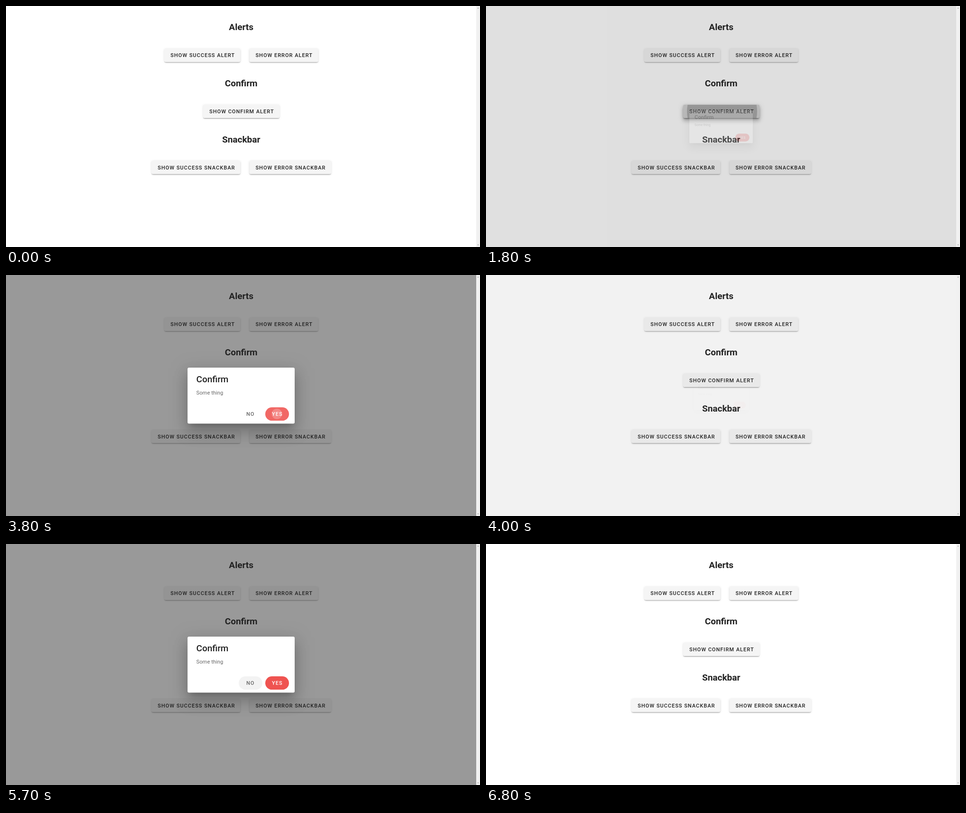
Animation of 1000 by 510 pixels, one loop 7.7 s. Source, as an HTML page:

```html
<!DOCTYPE html>
<html lang="en">
<head>
<meta charset="utf-8">
<title>Dialogs demo</title>
<style>
  html, body { margin: 0; width: 100%; height: 100%; overflow: hidden; background: #fff; }
  svg { display: block; width: 1000px; height: 510px; }
  text { font-family: Roboto, Arial, sans-serif; fill: #212121; white-space: pre; }
  .head { font-size: 19px; font-weight: 700; text-anchor: middle; }
  .label { font-size: 11.06px; font-weight: 500; letter-spacing: .0893em; }
  .title { font-size: 18.9px; font-weight: 500; }
  .body { font-size: 11.06px; letter-spacing: .0071em; }
</style>
</head>
<body>
<script>
const NS = 'http://www.w3.org/2000/svg';
const LOOP = 7700, STEP = 100;
const UNIT = 0.79; // page zoom

function set(node, attrs) {
  for (const k in attrs) node.setAttribute(k, attrs[k]);
  return node;
}
function add(parent, tag, attrs) {
  return parent.appendChild(set(document.createElementNS(NS, tag), attrs));
}
function rect(parent, x, y, width, height, rx, fill, more) {
  return add(parent, 'rect', { x, y, width, height, rx, fill, ...more });
}
function write(parent, cls, x, y, str, fill) {
  const node = add(parent, 'text', { class: cls, x, y });
  node.textContent = str;
  if (fill) node.style.fill = fill;
  return node;
}

const svg = add(document.body, 'svg', { viewBox: '0 0 1000 510' });
const defs = add(svg, 'defs', {});

// Each layer: [offset y, blur, spread, opacity]
const RAISED = [[3, 1, -2, .2], [2, 2, 0, .14], [1, 5, 0, .12]];
const PRESSED = [[5, 5, -3, .2], [8, 10, 1, .14], [3, 14, 2, .12]];
const MODAL = [[11, 15, -7, .2], [24, 38, 3, .14], [9, 46, 8, .12]];

function blurId(size) {
  const id = 'blur' + size;
  if (!document.getElementById(id)) {
    const f = add(defs, 'filter', { id, filterUnits: 'userSpaceOnUse', x: 0, y: 0, width: 1000, height: 510 });
    add(f, 'feGaussianBlur', { stdDeviation: size * UNIT / 2 });
  }
  return `url(#${id})`;
}
function shadow(parent, x, y, w, h, layers) {
  const g = add(parent, 'g', {});
  for (const [dy, blur, spread, opacity] of layers) {
    const s = spread * UNIT;
    rect(g, x - s, y - s + dy * UNIT, w + 2 * s, h + 2 * s, 3, '#000',
      { 'fill-opacity': opacity, filter: blurId(blur) });
  }
  return g;
}
function clip(id, x, y, w, h, rx) {
  rect(add(defs, 'clipPath', { id }), x, y, w, h, rx, '#000');
  return { 'clip-path': `url(#${id})` };
}
function ripple(parent, cx, cy, fill, area) {
  return add(add(parent, 'g', area), 'circle', { cx, cy, r: 0, fill, 'fill-opacity': 0 });
}

// Page
rect(svg, 0, 0, 1000, 510, 0, '#fff');
write(svg, 'head', 496.2, 51.4, 'Alerts');
write(svg, 'head', 496.2, 170, 'Confirm');
write(svg, 'head', 496.2, 288.6, 'Snackbar');

function button(x, y, w, str) {
  const h = 28.4;
  const lift = shadow(svg, x, y, w, h, PRESSED);
  lift.setAttribute('opacity', 0);
  shadow(svg, x, y, w, h, RAISED);
  rect(svg, x, y, w, h, 3.2, '#f5f5f5');
  const tint = rect(svg, x, y, w, h, 3.2, '#000', { 'fill-opacity': 0 });
  const slot = add(svg, 'g', {});
  write(svg, 'label', x + 13.1, y + 18.1, str);
  return { lift, tint, slot };
}
button(334, 90.3, 160.5, 'SHOW SUCCESS ALERT');
button(513.3, 90.3, 145.5, 'SHOW ERROR ALERT');
const main = button(416, 208.9, 161, 'SHOW CONFIRM ALERT');
button(307, 327.4, 187.5, 'SHOW SUCCESS SNACKBAR');
button(513.3, 327.4, 172.7, 'SHOW ERROR SNACKBAR');
const mainWave = ripple(main.slot, 498, 223, '#000', clip('mainArea', 416, 208.9, 161, 28.4, 3.2));

// Scroll bar and backdrop
const backdrop = rect(svg, 0, 0, 992, 510, 0, '#212121', { 'fill-opacity': 0 });
rect(svg, 992, 0, 8, 510, 0, '#f1f1f1');
add(svg, 'path', { d: 'M994.2 5.2l1.8-2 1.8 2zM994.2 504.8l1.8 2 1.8-2z', fill: '#a0a0a0' });

// Dialog
const dialog = add(svg, 'g', {});
shadow(dialog, 383, 196, 226, 118.5, MODAL);
rect(dialog, 383, 196, 226, 118.5, 3.2, '#fff');
write(dialog, 'title', 401.6, 227, 'Confirm');
write(dialog, 'body', 401.6, 253.3, 'Some thing', '#666');

function pill(x, fill, ink, tone, str, textX, id) {
  const box = [x, 280, 50, 28.3, 14.15];
  rect(dialog, ...box, fill);
  const tint = rect(dialog, ...box, tone, { 'fill-opacity': 0 });
  const wave = ripple(dialog, x + 24.5, 294, tone, clip(id, ...box));
  write(dialog, 'label', textX, 298.1, str, ink);
  return { tint, wave };
}
const no = pill(491, '#fff', '#666', '#000', 'NO', 507, 'noArea');
const yes = pill(547, '#ef5350', '#fff', '#fff', 'YES', 561, 'yesArea');

// Motion
const clamp = v => Math.min(1, Math.max(0, v));

// cubic-bezier(.25, .8, .25, 1)
function swing(v) {
  const x = clamp(v);
  if (x === 0 || x === 1) return x;
  let lo = 0, hi = 1;
  for (let i = 0; i < 24; i++) {
    const s = (lo + hi) / 2, q = 1 - s;
    if (.75 * s * q * q + .75 * s * s * q + s * s * s < x) lo = s; else hi = s;
  }
  const q = 1 - lo;
  return 2.4 * lo * q * q + 3 * lo * lo * q + lo ** 3;
}
const shown = (t, from, to) => swing((t - from) / 300) * (1 - swing((t - to) / 300));
const during = (t, from, to) => t >= from && t < to;
const ramp = (t, start) => clamp((t - start + 60) / 200) * (t >= start);
const hover = (t, on, off) => ramp(t, on) * (1 - ramp(t, off));
const alpha = (node, v) => node.setAttribute('fill-opacity', v.toFixed(4));

function wave(node, t, start, r0, speed, peak, end) {
  const on = during(t, start, end);
  const age = (t - start) / 100;
  set(node, { r: on ? r0 + speed * age : 0 });
  alpha(node, on ? peak * clamp(.55 + .45 * age) : 0);
}

function draw(t) {
  const second = t >= 4500;

  const press = second ? 5000 : 1700;
  const closing = second ? 6400 : 3800;
  const held = during(t, press + 100, closing);
  const over = held ? .14 : .07 * (second ? hover(t, 4500, closing) : hover(t, 1300, closing));
  alpha(main.tint, t < closing ? over : 0);
  main.lift.setAttribute('opacity', during(t, press, press + 200) ? 1 : 0);
  wave(mainWave, t, press, 26, 48, .19, closing);

  alpha(backdrop, .46 * (shown(t, 1772, 3883) + shown(t, 5122, 6540)));

  const p = shown(t, 1783, 3812) + shown(t, 5117, 6480);
  const k = .5 + .5 * p;
  set(dialog, {
    opacity: p.toFixed(4),
    visibility: p > 0 ? 'visible' : 'hidden',
    transform: `translate(496 255.25) scale(${k}) translate(-496 -255.25)`
  });

  alpha(yes.tint, second ? 0 : .08 * hover(t, 2500, 3100) + (t >= 3700 ? .12 : 0));
  alpha(no.tint, .048 * (hover(t, 3200, 3500) + ramp(t, 5500)));
  wave(yes.wave, t, 3700, 4, 7, .22, 4200);
  wave(no.wave, t, 6400, 5, 9, .13, 6900);
}

let origin;
function tick(now) {
  if (origin === undefined) origin = now;
  draw(Math.floor((now - origin) % LOOP / STEP) * STEP);
  requestAnimationFrame(tick);
}
draw(0);
requestAnimationFrame(tick);
</script>
</body>
</html>
```
